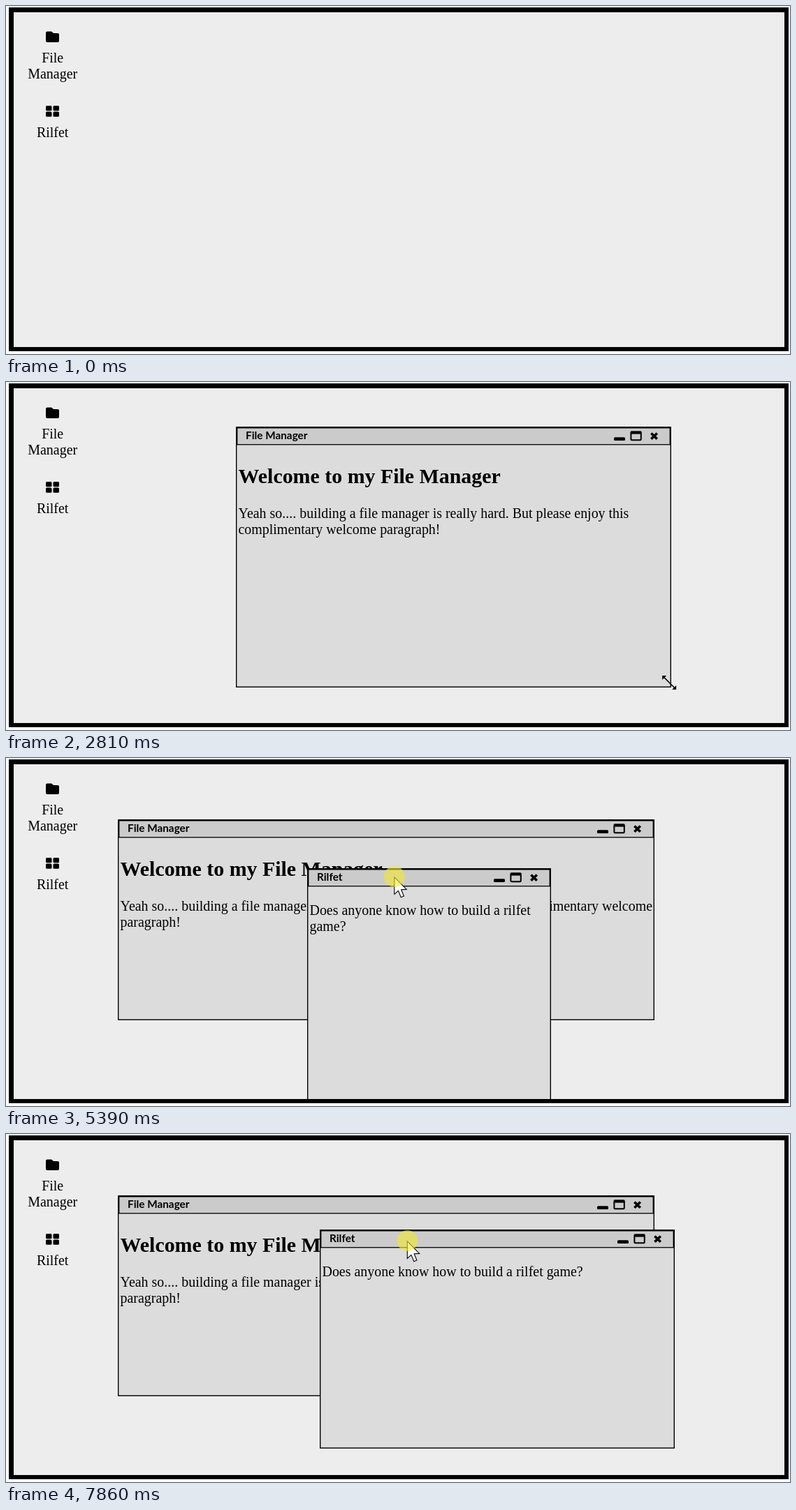
Animation, 1122 px wide and 499 px high, one loop 8 s. Source, as an HTML page with a canvas:

```html
<!DOCTYPE html>
<html lang="en">
<head>
<meta charset="utf-8">
<title>Desktop windows</title>
<style>
  html, body { margin: 0; width: 100%; height: 100%; overflow: hidden; background: #fff; }
  canvas { display: block; }
</style>
</head>
<body>
<canvas id="stage" width="1122" height="499"></canvas>
<script>
const ctx = document.getElementById('stage').getContext('2d');
const LOOP = 8000;
const SERIF = '"Liberation Serif", "Times New Roman", serif';
const BODY = `19.95px ${SERIF}`;
const HEADING = `bold 29.9px ${SERIF}`;
const TITLE = 'bold 15.3px Lato, sans-serif';
const LINE = 23.4;
const CREEP = 4; // how far the pointer slides down a title bar during a drag

const files = {
  title: 'File Manager',
  heading: 'Welcome to my File Manager',
  text: 'Yeah so.... building a file manager is really hard. But please enjoy this complimentary welcome paragraph!',
  textY: 131,
  opens: 1000,
  place: { l: 330, t: 161, r: 953.2, b: 535 }
};
const game = {
  title: 'Rilfet',
  text: 'Does anyone know how to build a rilfet game?',
  textY: 67,
  opens: 4780,
  place: { l: 430.8, t: 158.3, r: 779.8, b: 588 }
};
const windows = [files, game];
const pointer = { x: 0, y: 0 };

// Gestures change the pointer and the windows by the eased share p.
function glide(from, to, target) {
  return { from, to, act(p) {
    const { x, y } = target();
    pointer.x += (x - pointer.x) * p;
    pointer.y += (y - pointer.y) * p;
  } };
}

function pull(from, to, win, edges, dx, dy) {
  const drag = edges === 'ltrb';
  return { from, to, press: from - 100, release: to + (drag ? 180 : 60), act(p) {
    pointer.x += dx * p;
    pointer.y += (dy + (drag ? CREEP : 0)) * p;
    for (const edge of edges) win.rect[edge] += ('lr'.includes(edge) ? dx : dy) * p;
  } };
}

const click = time => ({ from: time, to: time + 80, press: time, release: time + 80, act() {} });
const spot = (x, y) => () => ({ x, y });
const grip = (win, dx) => () => ({ x: win.rect.l + dx, y: win.rect.t + 12.5 });
const topLeft = win => () => ({ x: win.rect.l + 1.5, y: win.rect.t + 5.5 });
const bottomRight = win => () => ({ x: win.rect.r - 4.5, y: win.rect.b - 8.5 });

const gestures = [
  glide(70, 650, spot(60, 36)),
  click(790), click(920),
  glide(1000, 1500, grip(files, 219)),
  pull(1620, 1900, files, 'ltrb', -1.5, -97),
  glide(2080, 2800, bottomRight(files)),
  pull(2930, 3330, files, 'rb', 145, -86),
  glide(3460, 3720, grip(files, 370)),
  pull(3800, 4150, files, 'ltrb', -168.3, 24),
  glide(4180, 4530, spot(67, 150)),
  click(4580), click(4710),
  glide(4780, 5320, grip(game, 125)),
  pull(5390, 5600, game, 'ltrb', 108, -63),
  pull(5600, 5930, game, 'ltrb', -301, -25),
  glide(5970, 6190, topLeft(game)),
  pull(6280, 6880, game, 'lt', 21, 190),
  pull(6880, 7210, game, 'lt', -180, -74),
  glide(7250, 7400, grip(game, 125)),
  pull(7480, 7860, game, 'ltrb', 370.5, -49)
];

function pose(time) {
  Object.assign(pointer, { x: 980, y: 427 });
  for (const win of windows) win.rect = { ...win.place };
  for (const { from, to, act } of gestures) {
    const p = Math.min(1, Math.max(0, (time - from) / (to - from)));
    act(p * p * (3 - 2 * p));
  }
}

function box(x, y, w, h, color) {
  ctx.fillStyle = color;
  ctx.fillRect(x, y, w, h);
}

function rounded(x, y, w, h, r) {
  ctx.beginPath();
  ctx.roundRect(x, y, w, h, r);
  ctx.fill();
}

function write(text, x, y, font, align = 'left') {
  ctx.font = font;
  ctx.textAlign = align;
  ctx.fillStyle = '#000';
  ctx.fillText(text, x, Math.round(y));
}

function shape(points) {
  ctx.beginPath();
  points.forEach(([x, y]) => ctx.lineTo(x, y));
  ctx.closePath();
}

function paragraph(text, x, y, width) {
  ctx.font = BODY;
  let line = '';
  for (const word of text.split(' ')) {
    const longer = line ? `${line} ${word}` : word;
    if (line && ctx.measureText(longer).width > width) {
      write(line, x, y, BODY);
      y += LINE;
      line = word;
    } else {
      line = longer;
    }
  }
  write(line, x, y, BODY);
}

function drawDesktop() {
  box(0, 0, 1122, 499, '#fff');
  box(4, 2, 1116, 493, '#000');
  box(11, 9, 1103, 480, '#ededed');

  ctx.fillStyle = '#000';
  rounded(57, 36.5, 9, 8, 2);
  rounded(57, 39, 19, 13, 2);
  shape([[64, 36.7], [65.4, 36.8], [68, 39.1], [64, 40]]);
  ctx.fill();
  write('File', 66.7, 81, BODY, 'center');
  write('Manager', 66.7, 104, BODY, 'center');

  for (const x of [57, 67.5])
    for (const y of [143, 151.5]) rounded(x, y, 8.5, 7.3, 1.6);
  write('Rilfet', 66.7, 188, BODY, 'center');
}

function drawControls(right, top) {
  ctx.fillStyle = ctx.strokeStyle = '#000';
  rounded(right - 82, top + 15.3, 16, 4.6, 1.5);

  ctx.lineWidth = 2;
  ctx.beginPath();
  ctx.roundRect(right - 57.6, top + 7.4, 14.4, 11.8, 1.2);
  ctx.stroke();
  box(right - 58, top + 6.6, 15.2, 4, '#000');

  const x = right - 24.4, y = top + 13.6, r = 4.2;
  ctx.lineWidth = 3.6;
  ctx.beginPath();
  for (const s of [-1, 1]) {
    ctx.moveTo(x - r, y - r * s);
    ctx.lineTo(x + r, y + r * s);
  }
  ctx.stroke();
}

function drawWindow(win) {
  const [x, y, right, bottom] = [...'ltrb'].map(edge => Math.round(win.rect[edge]));
  const w = right - x, h = bottom - y;
  ctx.save();
  ctx.beginPath();
  ctx.rect(x, y, w, h);
  ctx.clip();
  box(x, y, w, h, '#000');
  box(x + 1.4, y + 1.4, w - 2.8, h - 2.8, '#dcdcdc');
  box(x, y, w, 26.4, '#000');
  box(x + 2.4, y + 2.5, w - 4.8, 22.6, '#cacbca');
  write(win.title, x + 14, y + 18.4, TITLE);
  drawControls(right, y);
  if (win.heading) write(win.heading, x + 3.6, y + 81, HEADING);
  paragraph(win.text, x + 3.5, y + win.textY, w - 5);
  ctx.restore();
}

function drawArrow() {
  shape([[0, 0], [0, 24.6], [5.6, 19.6], [9.5, 29], [13.6, 27.2], [9.8, 18], [17.4, 17.6]]);
  ctx.fillStyle = '#fff';
  ctx.fill();
  ctx.strokeStyle = '#000';
  ctx.lineWidth = 1.1;
  ctx.stroke();
}

function drawResizer() {
  ctx.strokeStyle = ctx.fillStyle = '#000';
  ctx.lineWidth = 1.7;
  for (const s of [-1, 1]) {
    ctx.beginPath();
    ctx.moveTo(2, 1.5);
    ctx.lineTo(2 + 8 * s, 1.5 + 8 * s);
    ctx.stroke();
    shape([[2 + 10 * s, 1.5 + 10 * s], [2 + 4 * s, 1.5 + 10 * s], [2 + 10 * s, 1.5 + 4 * s]]);
    ctx.fill();
  }
}

function nearCorner({ rect }) {
  const near = (x, y) => Math.hypot(pointer.x - x, pointer.y - y) < 12;
  return near(rect.l, rect.t) || near(rect.r, rect.b);
}

function drawPointer(time, open) {
  ctx.save();
  ctx.translate(pointer.x, pointer.y);
  if (open.some(nearCorner)) drawResizer();
  else drawArrow();
  if (gestures.some(g => time >= g.press && time < g.release)) {
    ctx.fillStyle = 'rgba(240, 232, 50, 0.62)';
    ctx.beginPath();
    ctx.arc(0, -0.8, 15, 0, Math.PI * 2);
    ctx.fill();
  }
  ctx.restore();
}

function draw(time) {
  pose(time);
  drawDesktop();
  ctx.save();
  ctx.beginPath();
  ctx.rect(11, 9, 1103, 480);
  ctx.clip();
  const open = windows.filter(win => time >= win.opens);
  open.forEach(drawWindow);
  if (time >= 70) drawPointer(time, open);
  ctx.restore();
}

const start = performance.now();
function tick() {
  draw((performance.now() - start) % LOOP);
  requestAnimationFrame(tick);
}
tick();
</script>
</body>
</html>
```
